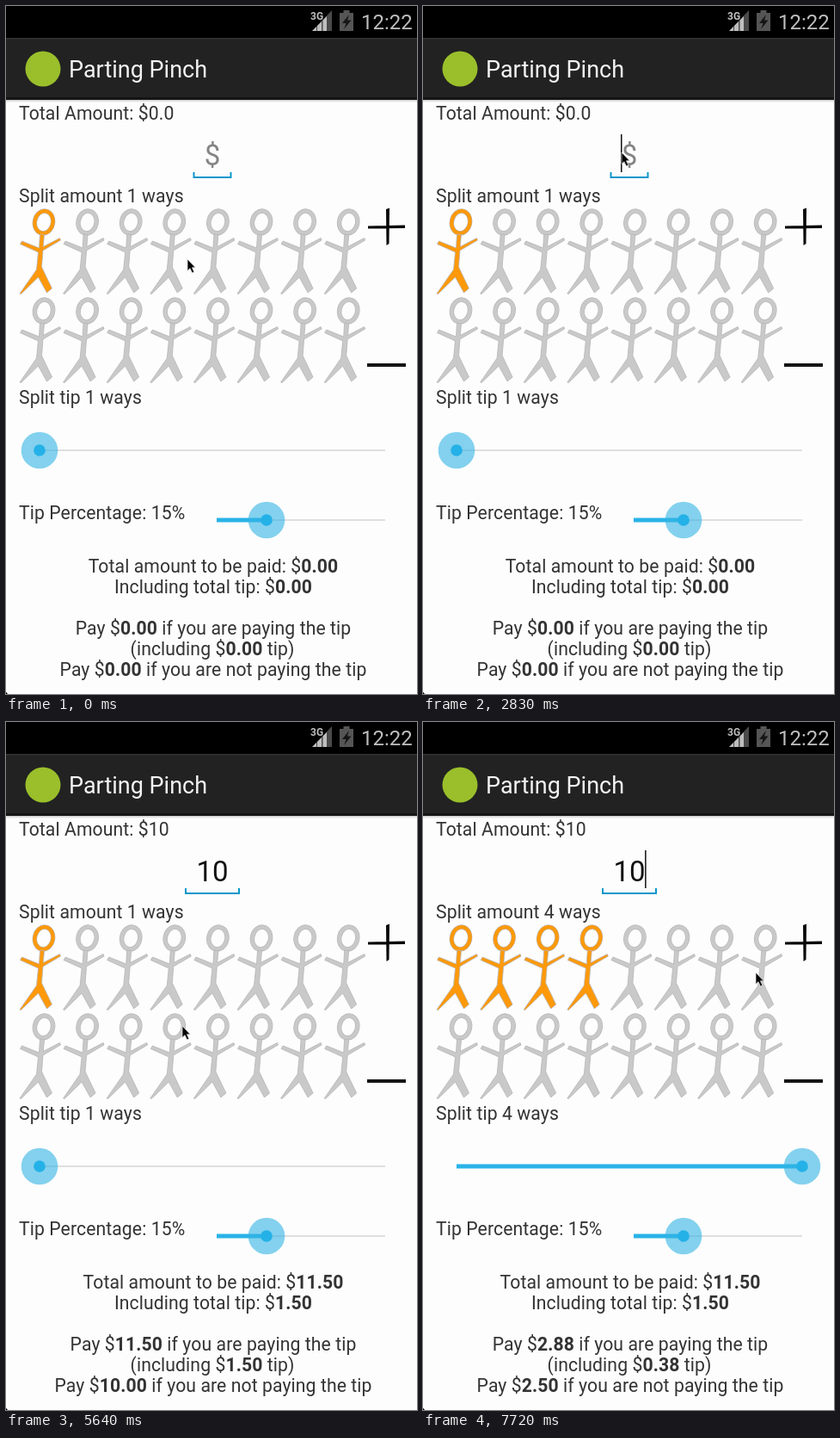
An HTML page that plays this animation: 478 by 799 pixels, repeating every 8000 ms.

```html
<!DOCTYPE html>
<html lang="en">
<head>
<meta charset="utf-8">
<title>Parting Pinch</title>
<style>
html, body { margin: 0; width: 100%; height: 100%; overflow: hidden; background: #fdfdfd; }
svg { display: block; width: 478px; height: 799px; font-family: Roboto, sans-serif; }
.body { font-size: 21.2px; letter-spacing: .08px; fill: #333; white-space: pre; }
.mid { text-anchor: middle; }
.field { font-size: 33px; text-anchor: middle; }
.b { font-weight: 700; }
.off { color: #c9c9c9; }
.on { color: #ff990a; }
</style>
</head>
<body>
<svg viewBox="0 0 478 799">
  <defs>
    <linearGradient id="shade" x2="0" y2="1">
      <stop offset="0" stop-color="#c8c8c8"/>
      <stop offset="1" stop-color="#fdfdfd"/>
    </linearGradient>
    <g id="person" fill="currentColor" stroke="#b5b5b5" stroke-width=".8" stroke-linejoin="round">
      <ellipse cx="29" cy="15" rx="10.500" ry="13" transform="rotate(12 29 15)" fill="none" stroke-width="5.400"/>
      <ellipse cx="29" cy="15" rx="10.500" ry="13" transform="rotate(12 29 15)" fill="none" stroke="currentColor" stroke-width="4.200"/>
      <path d="M24.500 29 29.500 29.500 28.300 43.500 47.500 33.500 48.500 36 28 48 26.500 67 38.500 92 32.500 97 22.500 79 2.500 98.500 1 98 20.500 70 22.500 50 1.500 40.500 3.500 37 23.500 45Z"/>
    </g>
    <g id="thumb">
      <circle r="21.300" fill="#33b5e5" fill-opacity=".6"/>
      <circle r="6.800" fill="#24b1e7"/>
    </g>
  </defs>
  <rect width="478" height="799" fill="#fdfdfd"/>
  <rect width="478" height="38" fill="#000"/>
  <rect y="38" width="478" height="70" fill="#222"/>
  <rect y="37" width="478" height="1.500" fill="#333"/>
  <rect y="106" width="478" height="3" fill="#151515"/>
  <rect y="109" width="478" height="3" fill="url(#shade)"/>
  <circle cx="43" cy="73" r="20.500" fill="#9abf2b"/>
  <text x="73" y="83" font-size="27" fill="#f3f3f3">Parting Pinch</text>

  <text x="354" y="16" font-size="12" font-weight="700" fill="#bebebe">3G</text>
  <path d="M379 5V29H356Z" fill="#4a4a4a"/>
  <path d="M361 24V29H356ZM367 18V29H362V23ZM373 12V29H368.500V16.500Z" fill="#bebebe"/>
  <path d="M392.500 5H399.500V8H404V29H388V8H392.500Z" fill="#555"/>
  <path d="M399 10 391 20H395.500L393 27 401.500 16.500H397Z" fill="#161616"/>
  <text x="413" y="27" font-size="24" fill="#bebebe">12:22</text>

  <text id="amount" class="body" x="15" y="132"></text>
  <text id="entry" class="field" x="240" y="184.500"></text>
  <path id="line" fill="none" stroke="#0a97cb" stroke-width="2"/>
  <rect id="caret" y="149" width="1.500" height="44" fill="#111"/>
  <text id="ways" class="body" x="15" y="228"></text>
  <g id="people"></g>
  <path d="M421 255.500 464 254.500V258L421 258.500ZM442 236 446 234.500 445.500 276 442.500 278Z" fill="#080808"/>
  <rect x="420" y="415" width="45" height="4" fill="#151515"/>
  <text id="tipWays" class="body" x="15" y="462"></text>

  <rect x="39" y="515" width="402" height="2" fill="#dfdfdf"/>
  <rect id="fill" x="39" y="513.500" height="5" fill="#29b3e7"/>
  <use id="knob" href="#thumb" y="516"/>
  <text class="body" x="15" y="596">Tip Percentage: 15%</text>
  <rect x="245" y="596" width="196" height="2" fill="#dfdfdf"/>
  <rect x="245" y="594.500" width="58" height="5" fill="#29b3e7"/>
  <use href="#thumb" x="303" y="597"/>

  <g class="body mid">
    <text x="241" y="658">Total amount to be paid: $<tspan class="b" id="total"></tspan></text>
    <text x="241" y="682">Including total tip: $<tspan class="b" id="tip"></tspan></text>
    <text x="241" y="730">Pay $<tspan class="b" id="full"></tspan> if you are paying the tip</text>
    <text x="240" y="754">(including $<tspan class="b" id="share"></tspan> tip)</text>
    <text x="241" y="778">Pay $<tspan class="b" id="bare"></tspan> if you are not paying the tip</text>
  </g>
  <path d="M0 796.500 2 799H0Z" fill="#000"/>
  <path id="pointer" d="M0 0V13.500L3 10.700 5.500 16 7.800 15 5.500 9.800H9.300Z" fill="#050505" stroke="#eee" stroke-width=".7"/>
</svg>
<script>
const LOOP = 8000;
const STEP = 148.3;   // the screen refreshes once per step
const BLINK = 3.43;   // caret half-period, in steps
const $ = id => document.getElementById(id);
const set = (id, attrs) => {
  for (const k in attrs) $(id).setAttribute(k, attrs[k]);
};

// Pointer key points: step, x, y
const path = [
  [0, 211, 294], [2, 236, 255], [14, 236, 255], [16, 222, 188], [19, 231, 170], [28, 231, 170],
  [30, 208, 335], [33, 354, 299], [35, 320, 258], [37, 176, 300], [38, 205, 353],
  [39, 220, 282], [41, 172, 274], [43, 195, 285], [46, 195, 285], [50, 387, 291]
];

function pointerAt(step) {
  const i = path.findIndex(p => p[0] > step);
  if (i < 0) return path[path.length - 1].slice(1);
  const [a, b] = [path[i - 1], path[i]];
  const k = (step - a[0]) / (b[0] - a[0]);
  return [1, 2].map(n => a[n] + (b[n] - a[n]) * k);
}

const people = Array.from({ length: 16 }, (_, i) => {
  const u = document.createElementNS('http://www.w3.org/2000/svg', 'use');
  u.setAttribute('href', '#person');
  u.setAttribute('x', 15 + (i % 8) * 50.6);
  u.setAttribute('y', i < 8 ? 236 : 339);
  return $('people').appendChild(u);
});

let shown = '';
function showBill(entry, ways) {
  if (shown === entry + '/' + ways) return;
  shown = entry + '/' + ways;
  const sum = Number(entry), tip = sum * 0.15;
  const texts = {
    amount: 'Total Amount: $' + (entry || '0.0'),
    ways: `Split amount ${ways} ways`,
    tipWays: `Split tip ${ways} ways`,
    entry: entry || '$',
    total: (sum + tip).toFixed(2),
    tip: tip.toFixed(2),
    full: ((sum + tip) / ways).toFixed(2),
    share: (tip / ways).toFixed(2),
    bare: (sum / ways).toFixed(2)
  };
  for (const id in texts) $(id).textContent = texts[id];

  const half = entry.length > 1 ? 31 : 21.5;
  set('entry', { fill: entry ? '#111' : '#858585' });
  set('line', { d: `M${240 - half} 193V199H${240 + half}V193` });
  set('caret', { x: entry ? 239.7 + 9.2 * entry.length : 230 });
  const x = ways > 1 ? 441 : 39;
  set('fill', { width: x - 39 });
  set('knob', { x });
  people.forEach((p, i) => p.setAttribute('class', i < ways ? 'on' : 'off'));
}

function draw(t) {
  const step = Math.floor(t / STEP);
  const typed = Math.min(2, Math.max(0, Math.floor((step - 21) / 2)));
  showBill('10'.slice(0, typed), step < 46 ? 1 : 4);

  // Typing keeps the caret lit and restarts its blinking
  const since = typed ? Math.max(0, step - 24.31) : step - 3.1;
  const lit = Math.floor(since / BLINK) % 2 === 0;
  set('caret', { visibility: lit ? 'visible' : 'hidden' });
  set('pointer', { transform: `translate(${pointerAt(step)})` });
}

const start = performance.now();
function tick() {
  draw((performance.now() - start) % LOOP);
  requestAnimationFrame(tick);
}
tick();
</script>
</body>
</html>
```
